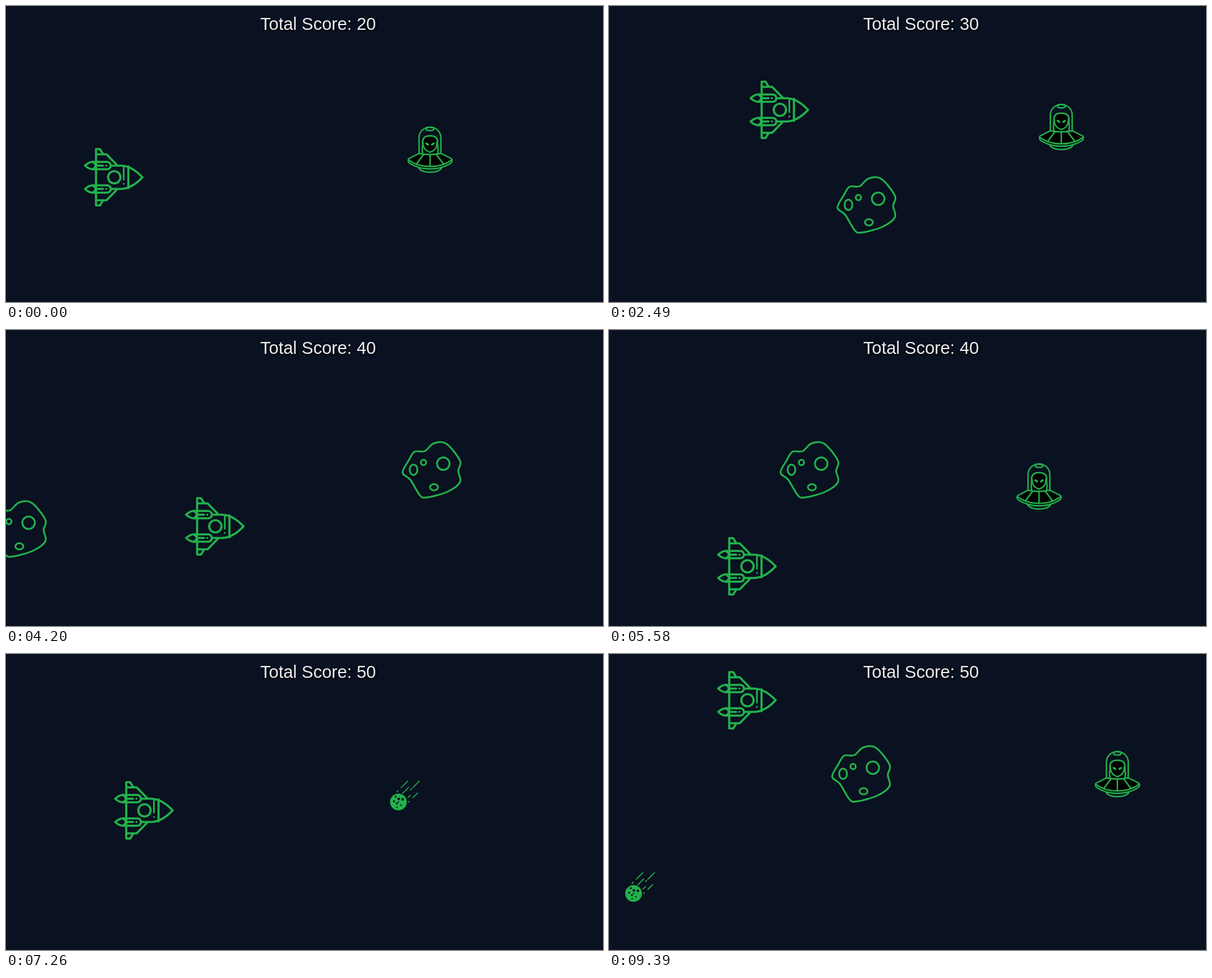
An HTML page with a canvas for the animation above (9420 ms loop, 998 by 496 pixels).

```html
<!DOCTYPE html>
<html lang="en">
<head>
<meta charset="utf-8">
<title>Space shooter</title>
<style>
html, body { margin: 0; width: 100%; height: 100%; overflow: hidden; background: #0a1120; }
canvas { display: block; }
</style>
</head>
<body>
<canvas id="stage" width="998" height="496"></canvas>
<script>
const ctx = document.getElementById('stage').getContext('2d');
const LOOP = 9420, STEP = 30;
const BACK = '#0a1120', GREEN = '#22b14c';

function line(...p) {
  ctx.beginPath();
  for (let i = 0; i < p.length; i += 2) ctx.lineTo(p[i], p[i + 1]);
  ctx.stroke();
}

function oval(x, y, rx, ry = rx, tilt = 0) {
  ctx.beginPath();
  ctx.ellipse(x, y, rx, ry, tilt, 0, Math.PI * 2);
}

function ring(...a) { oval(...a); ctx.stroke(); }
function disc(...a) { oval(...a); ctx.fill(); }
function curve(d) { ctx.stroke(new Path2D(d)); }

function panel(d) {
  const shape = new Path2D(d);
  ctx.fillStyle = '#000';
  ctx.fill(shape);
  ctx.fillStyle = GREEN;
  ctx.stroke(shape);
}

// Closed Catmull-Rom outline through the points
function blob(points) {
  const n = points.length;
  const at = i => points[(i + n) % n];
  ctx.beginPath();
  ctx.moveTo(...points[0]);
  for (let i = 0; i < n; i++) {
    const [a, b, c, d] = [at(i - 1), at(i), at(i + 1), at(i + 2)];
    ctx.bezierCurveTo(b[0] + (c[0] - a[0]) / 6, b[1] + (c[1] - a[1]) / 6,
      c[0] - (d[0] - b[0]) / 6, c[1] - (d[1] - b[1]) / 6, ...c);
  }
  ctx.closePath();
  ctx.stroke();
}

// Draws a part and its reflection in the given axis
function mirror(axis, vertical, part) {
  part();
  ctx.save();
  if (vertical) { ctx.translate(0, 2 * axis); ctx.scale(1, -1); }
  else { ctx.translate(2 * axis, 0); ctx.scale(-1, 1); }
  part();
  ctx.restore();
}

function rocket() {
  ctx.lineWidth = 3.6;
  mirror(49, true, () => {
    curve('M19.5 49 V1.8 H26 L31.5 10.5 H37 L54.5 28.5 M19.5 10.5 H31.5');
    curve('M1 29.5 Q8 23 14 23.3 H38 A6.1 6.1 0 0 1 38 35.5 H14 Q8 35.5 1 29.5');
    curve('M14 23.3 Q23.5 29.5 14 35.5 M21 29.5 H31');
    curve('M45 29.5 H62 Q80 30.5 97 49');
    disc(36.5, 29.5, 1.7);
  });
  ring(50, 49, 10.3);
  line(73.5, 30.5, 73.5, 67.5);
  ctx.lineWidth = 2.8;
  line(65.8, 31, 65.8, 53);
  disc(65.8, 60, 1.6);
}

function asteroid() {
  ctx.lineWidth = 3;
  blob([[1, 51], [11, 31], [21, 16], [38, 15], [53, 2], [74, 2.5], [97, 31],
        [94, 48], [97, 67], [76, 83], [42, 92.5], [30, 89], [14, 63]]);
  ring(69, 36, 10.5);
  ring(36, 34, 4.4);
  ring(19.3, 46.2, 6.5, 8.8);
  ring(53.5, 75.5, 6.7, 5.2);
}

function ufo() {
  ctx.lineWidth = 2.4;
  curve('M19.5 46 V18.5 A18.3 18 0 0 1 56 18.5 V46');
  ring(37.8, 5, 6.5, 2.8);
  panel('M25.5 45 Q24 38 25.5 33 V26 Q26 16.5 38 16.5 Q50 16.5 50.5 26 V33 Q52 38 50.5 45');
  panel('M19.5 46 Q37.8 50 56 46 L74 55 Q77 60 70 64 Q56 72 37.8 72 Q20 72 6 64 Q-1 60 2 55 Z');
  curve('M2 57 Q16 68 37.8 68 Q60 68 74 57');
  curve('M19 71 Q24 77.5 37.8 77.5 Q52 77.5 57 71');
  line(37.8, 49, 37.8, 67);
  mirror(37.8, false, () => {
    curve('M26 27 Q26 38 33 42 L37.8 44 M27 48 L15 64');
    disc(33, 30.3, 3.5, 1.8, 0.6);
  });
}

function meteor() {
  disc(14, 36, 14);
  ctx.lineWidth = 1.7;
  // Streaks on the diagonals x + y = sum
  for (const [sum, from, to] of [[30.5, 11.5, 13.5], [30.5, 18.5, 29.5], [42.5, 21, 31],
    [50, 34, 36], [50, 38, 49], [58.5, 30, 34], [67, 31, 32], [67, 38, 46]])
    line(from, sum - from, to, sum - to);
  ctx.fillStyle = BACK;
  for (let i = 0; i < 8; i++) {
    const a = i * 2.4, r = 3.8 * Math.sqrt(i);
    disc(14 + r * Math.cos(a), 36 + r * Math.sin(a), 1.2 + i % 3 * 0.5);
  }
  ctx.fillStyle = GREEN;
}

// Position x, y at time `at`, speed in px/s, optional horizontal acceleration
const flyers = [
  { draw: asteroid, from: 435, to: 4500, at: 1620, x: 603, y: 287, vx: -260, vy: 0, ax: 11 },
  { draw: asteroid, from: 3285, to: 6960, at: 3420, x: 862, y: 188, vx: -250.6, vy: 0, ax: -15 },
  { draw: asteroid, from: 7635, to: LOOP, at: 9390, x: 372, y: 154.5, vx: -298, vy: 0 },
  { draw: ufo, from: 0, to: 1395, at: 0, x: 671, y: 201, vx: -235, vy: -76 },
  { draw: ufo, from: 1860, to: 2650, at: 1860, x: 901, y: 163, vx: -290, vy: 0 },
  { draw: ufo, from: 4770, to: 6490, at: 5580, x: 681, y: 222.5, vx: -287, vy: 98 },
  { draw: ufo, from: 9060, to: LOOP, at: 9390, x: 812, y: 161.5, vx: -287, vy: 0 },
  { draw: meteor, from: 6260, to: LOOP, at: 7260, x: 642, y: 212, vx: -288.7, vy: 72 }
];

// Steering: time, x, y
const course = [[0, 131, 238], [1100, 131, 104.5], [1620, 131, 104.5], [1770, 131, 76], [2160, 185, 125],
  [3000, 314, 125], [3420, 314, 125], [4200, 300, 280], [5400, 181.5, 347], [5760, 181.5, 347],
  [7260, 181.5, 213], [8640, 181.5, 117], [9300, 181.5, 28.5], [LOOP, 181.5, 28.5]];

function steer(t) {
  const i = course.findIndex(k => k[0] > t);
  const [t0, x0, y0] = course[i - 1], [t1, x1, y1] = course[i];
  const f = (t - t0) / (t1 - t0);
  return [x0 + (x1 - x0) * f, y0 + (y1 - y0) * f];
}

function drawAt(x, y, draw) {
  ctx.save();
  ctx.translate(x, y);
  draw();
  ctx.restore();
}

function drawScore(t) {
  const hits = flyers.filter(f => f.draw === ufo && t >= f.to).length;
  ctx.save();
  ctx.font = '29px "Liberation Sans", Arial, sans-serif';
  ctx.fillStyle = '#eeeeee';
  ctx.shadowColor = 'rgba(0, 0, 0, 0.7)';
  ctx.shadowOffsetX = ctx.shadowOffsetY = 2;
  ctx.shadowBlur = 3;
  ctx.fillText('Total Score: ' + (20 + 10 * hits), 425, 40);
  ctx.restore();
}

function render(t) {
  ctx.fillStyle = BACK;
  ctx.fillRect(0, 0, 998, 496);
  ctx.fillStyle = ctx.strokeStyle = GREEN;
  ctx.lineJoin = ctx.lineCap = 'round';
  for (const { draw, from, to, at, x, y, vx, vy, ax = 0 } of flyers) {
    if (t < from || t >= to) continue;
    const s = (t - at) / 1000;
    drawAt(x + vx * s + ax * s * s / 2, y + vy * s, draw);
  }
  drawAt(...steer(t), rocket);
  drawScore(t);
}

const start = performance.now();
function tick() {
  const t = Math.max(0, performance.now() - start) % LOOP;
  render(Math.floor(t / STEP) * STEP);
  requestAnimationFrame(tick);
}
tick();
</script>
</body>
</html>
```
